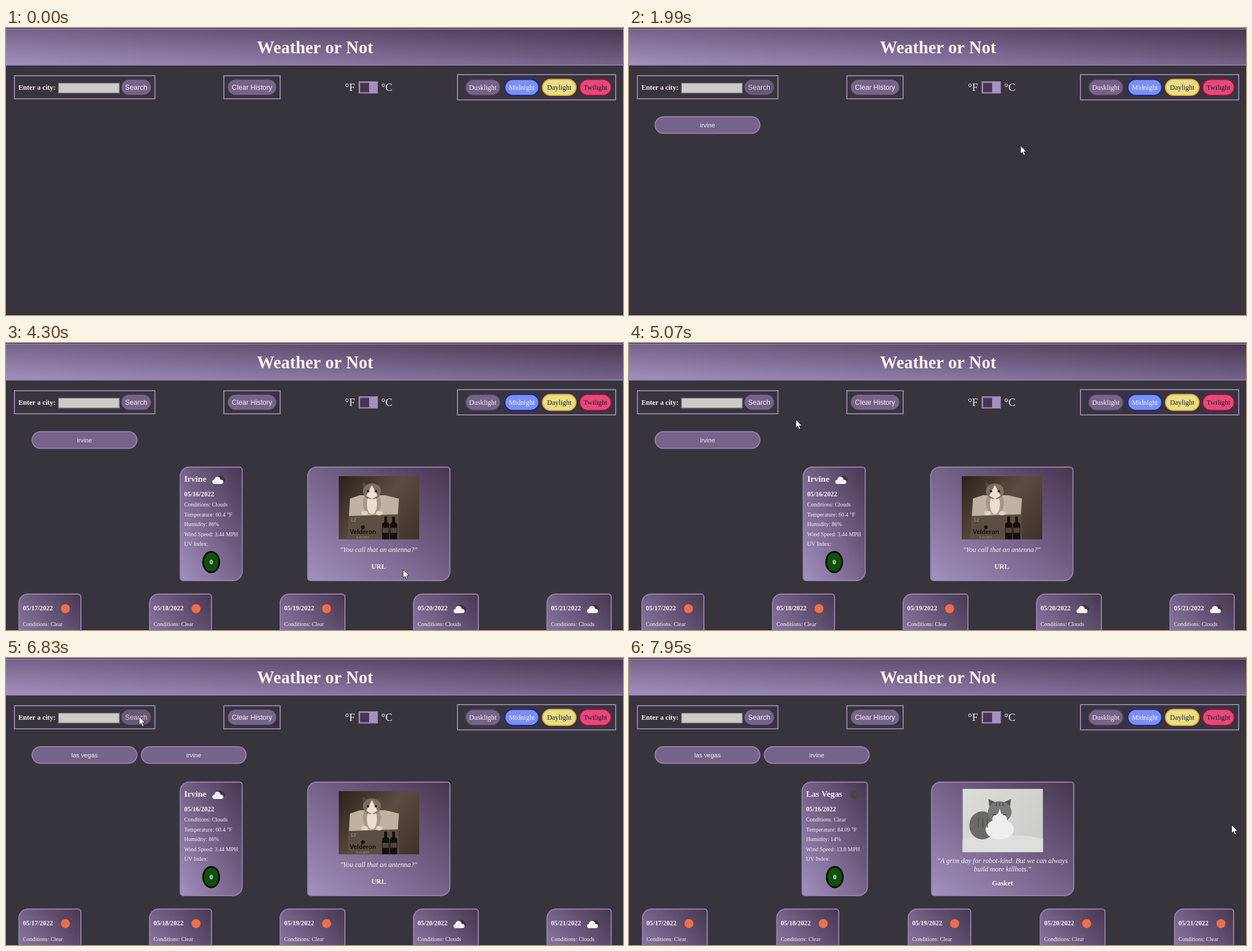
Animation of 1096x511 px, one loop 8 s. Source, as an HTML page with a canvas:

```html
<!DOCTYPE html>
<html lang="en">
<head>
<meta charset="utf-8">
<title>Weather or Not</title>
<style>
html, body { margin: 0; width: 100%; height: 100%; overflow: hidden; background: #38343d; }
canvas { display: block; }
</style>
</head>
<body>
<canvas id="stage" width="1096" height="511"></canvas>
<script>
const ctx = document.getElementById('stage').getContext('2d');
const LOOP = 8000, STEP = 70, ROW = 22.6;
const SERIF = '"Liberation Serif", "Times New Roman", serif';
const SANS = '"Liberation Sans", Arial, sans-serif';
const MENU = '"Open Sans", "Noto Sans", sans-serif';
const INK = '#ffeff3', EDGE = '#9680ae', MID = '#756389', LIGHT = '#a391bf', DARK = '#47364f';
const BACK = '#38343d', RIM = '#2b2730';

// Cursor: when it sets off, when it arrives, where
const FIELD = [154, 108], SEARCH = [236, 104];
const MOVES = [
  [200, 880, FIELD], [1020, 1230, [166, 141]], [1510, 1780, SEARCH],
  [1850, 1990, [695, 209]], [1990, 2480, [934, 266]],
  [2810, 3230, [705, 419]], [3430, 3570, [705, 403]],
  [4300, 4580, [878, 370]], [4580, 5070, [296, 136]],
  [5140, 5630, FIELD], [5980, 6190, [179, 143]], [6260, 6400, [172, 158]], [6540, 6760, SEARCH],
  [6830, 7390, [1098, 282]], [7390, 7950, [1070, 297]]
];

const SEARCHES = [
  { query: 'irvine', open: 880, pick: 1370, submit: 1850, ready: 2130, photoAt: 2340,
    name: 'Irvine', x: 308.5, w: 112, icon: 'cloud', quoteX: 535, photo: kitten,
    facts: ['Clouds', '60.4 °F', '86%', '3.44 MPH', ''],
    quote: ['"You call that an antenna?"'], quoteY: 372, by: 'URL', byY: 402,
    firstX: 22, gap: 120, widths: [112, 112, 117, 117, 116], clearDays: 3 },
  { query: 'las vegas', open: 5700, pick: 6470, submit: 6830, ready: 7600, photoAt: 7810,
    name: 'Las Vegas', x: 306.5, w: 118, icon: 'night', quoteX: 536.5, photo: tabby,
    facts: ['Clear', '84.09 °F', '14%', '13.8 MPH', ''],
    quote: ['"A grim day for robot-kind. But we can always', 'build more killbots."'],
    quoteY: 365, by: 'Gasket', byY: 405,
    firstX: 23, gap: 121.5, widths: [117, 112, 113, 117, 107], clearDays: 5 }
];
const LABELS = ['Conditions', 'Temperature', 'Humidity', 'Wind Speed', 'UV Index'];
const RECENT = ['irvine', 'las vegas', 'laayoune', 'Irvine', 'tokyo', 'houston'];

const ramp = (t, a, b) => Math.max(0, Math.min(1, (t - a) / (b - a)));
const ease = p => p * p * (3 - 2 * p);

function text(s, x, y, size, { font = SERIF, style = '', color = INK, align = 'left' } = {}) {
  ctx.font = `${style} ${size}px ${font}`;
  ctx.fillStyle = color;
  ctx.textAlign = align;
  ctx.fillText(s, x, y);
}

function rect(x, y, w, h, color) {
  ctx.fillStyle = color;
  ctx.fillRect(x, y, w, h);
}

function frame(x, y, w, h) {
  ctx.strokeStyle = EDGE;
  ctx.lineWidth = 2;
  ctx.strokeRect(x + 1, y + 1, w - 2, h - 2);
}

function round(x, y, w, h, r, fill, edge) {
  const inset = edge ? 1 : 0;
  ctx.beginPath();
  ctx.roundRect(x + inset, y + inset, w - 2 * inset, h - 2 * inset, r);
  ctx.fillStyle = fill;
  ctx.fill();
  if (!edge) return;
  ctx.strokeStyle = edge;
  ctx.lineWidth = 2;
  ctx.stroke();
}

function oval(x, y, rx, ry, color) {
  ctx.fillStyle = color;
  ctx.beginPath();
  ctx.ellipse(x, y, rx, ry, 0, 0, 7);
  ctx.fill();
}

function poly(color, ...p) {
  ctx.fillStyle = color;
  ctx.beginPath();
  for (let i = 0; i < p.length; i += 2) ctx.lineTo(p[i], p[i + 1]);
  ctx.closePath();
  ctx.fill();
}

function blend(x0, y0, x1, y1, ...colors) {
  const g = ctx.createLinearGradient(x0, y0, x1, y1);
  colors.forEach((c, i) => g.addColorStop(i / (colors.length - 1), c));
  return g;
}

// Corner to corner, bottom left to top right
function dusk(x, y, w, h) {
  const k = w * h / (w * w + h * h), cx = x + w / 2, cy = y + h / 2;
  return blend(cx - h * k, cy + w * k, cx + h * k, cy - w * k, LIGHT, MID, DARK);
}

function card(x, y, w, h) {
  round(x, y, w, h, [16, 5, 16, 5], dusk(x, y, w, h), EDGE);
}

function cloud(x, y) {
  const puff = '#f5f2f3', shade = '#3b343f';
  oval(x + 4, y - 3, 5, 4.5, shade);
  oval(x + 8, y, 4.5, 4, shade);
  oval(x - 1, y, 5.5, 5.5, puff);
  round(x - 10, y, 19.5, 7.5, 3.7, puff);
}

function photo(x, y, paint) {
  ctx.save();
  ctx.translate(x, y);
  ctx.beginPath();
  ctx.rect(0, 0, 143, 112.5);
  ctx.clip();
  paint();
  ctx.restore();
}

function ears(x, y, reach, color) {
  for (const s of [-1, 1]) poly(color, x + s * reach, y, x + s * 5, y + 7, x + s * (reach - 2), y + 18);
}

function kitten() {
  rect(0, 0, 143, 113, blend(0, 0, 143, 113, '#2b221b', '#5a4c40', '#3d3128'));
  poly('#bfb2a0', 20, 40, 38, 34, 82, 34, 107, 40, 105, 70, 18, 72);
  poly('#5b4e42', 18, 71, 106, 68, 107, 113, 15, 113);
  oval(59, 48, 16, 21, '#a59786');
  oval(59, 50, 9, 18, '#e8dfd2');
  ears(59, 10, 17, '#55483d');
  oval(59, 27, 16, 14, '#7d6e60');
  poly('#ebe2d5', 59, 16, 69, 35, 59, 41, 49, 35);
  for (const s of [-1, 1]) {
    oval(59 + s * 7, 27, 2.4, 2, '#201a16');
    oval(59 + s * 13, 66, 6, 4, '#ddd2c3');
    const x = 90 + s * 7;
    rect(x - 2, 72, 5, 14, '#15100d');
    round(x - 6, 82, 13, 34, 5, '#15100d');
    rect(x - 5, 92, 11, 9, '#51443a');
  }
  text('12', 21, 81, 9, { font: SANS, color: '#a59686' });
  oval(43, 91, 3.5, 3.5, '#1d1713');
  text('Velderon', 43, 103, 11, { font: SANS, style: 'bold', color: '#15100d', align: 'center' });
  text('LIGHT', 43, 111, 7, { style: 'bold', color: '#8c7e6f', align: 'center' });
}

function tabby() {
  rect(0, 0, 143, 113, blend(0, 0, 143, 113, '#dcddd8', '#c9cbc6'));
  oval(75, 113, 110, 31, '#dededb');
  oval(35, 65, 23, 25, '#6c6a67');
  oval(66, 72, 25, 18, '#eeeeec');
  ears(66, 18, 20, '#5a5855');
  oval(66, 41, 21, 19, '#7b7976');
  oval(66, 54, 13, 10, '#efeeec');
  poly('#efeeec', 66, 35, 71, 52, 61, 52);
  for (const s of [-1, 0, 1]) {
    rect(65.3 + s * 6, 24, 1.4, 7, '#454340');
    rect(35 + s * 8, 52, 2, 17, '#55534f');
    if (s) rect(62.5 + s * 9, 45, 7, 1.5, '#454340');
  }
}

function weather(c, t) {
  const x = c.x + 8, mid = c.x + c.w / 2, q = c.quoteX + 127;
  card(c.x, 220, c.w, 204);
  text(c.name, x, 247, 15.1, { style: 'bold' });
  if (c.icon === 'cloud') cloud(376.5, 243.5);
  else oval(401, 244, 8, 8, '#48444a');
  text('05/16/2022', x, 273, 11.7, { style: 'bold' });
  c.facts.forEach((s, i) => text(`${LABELS[i]}: ${s}`, x, 291 + i * 17.6, 10));
  oval(mid, 390, 15.8, 19.8, '#040804');
  oval(mid, 390, 12.8, 16.8, '#0f500f');
  text('0', mid, 394, 12.4, { style: 'bold', align: 'center' });

  card(c.quoteX, 220, 254.5, 204);
  if (t >= c.photoAt) photo(q - 71, c.quoteY - 135 + (c.quote.length - 1) * 3, c.photo);
  c.quote.forEach((s, i) => text(s, q, c.quoteY + i * 14.5, 12.4, { style: 'italic', align: 'center' }));
  text(c.by, q, c.byY, 12.4, { style: 'bold', align: 'center' });

  let left = c.firstX;
  c.widths.forEach((w, i) => {
    const clear = i < c.clearDays;
    card(left, 446, w, 160);
    text(`05/${17 + i}/2022`, left + 8, 475.5, 11.7, { style: 'bold' });
    if (clear) oval(left + 83.5, 473, 8, 8, '#ec6e4c');
    else cloud(left + 82, 473.5);
    text('Conditions: ' + (clear ? 'Clear' : 'Clouds'), left + 8, 503.5, 10);
    left += w + c.gap;
  });
}

function button(label, x, w) {
  round(x, 92, w, 27, 13.5, MID);
  text(label, x + w / 2, 109.5, 12.4, { font: SANS, align: 'center' });
}

function theme(label, x, w, fill, edge, color) {
  round(x, 90.5, w, 30.5, 15, fill, edge);
  text(label, x + w / 2, 110, 12.4, { align: 'center', color });
}

function page(t) {
  rect(0, 0, 1096, 511, BACK);
  rect(0, 0, 1096, 1, RIM);
  rect(0, 510, 1096, 1, RIM);
  rect(0, 1, 1096, 65.5, dusk(0, 1, 1096, 65.5));
  for (const y of [1, 65]) rect(0, y, 1096, 1.6, EDGE);
  text('Weather or Not', 549, 45, 31, { style: 'bold', align: 'center' });

  frame(14, 84, 251.5, 43);
  text('Enter a city:', 22, 109.5, 12.4, { style: 'bold' });
  const hover = Math.max(...SEARCHES.map(({ submit: s }) =>
    ramp(t, s - 210, s - 90) * (1 - ramp(t, s + 180, s + 560))));
  ctx.globalAlpha = 1 - 0.2 * hover;
  button('Search', 205, 52.5);
  ctx.globalAlpha = 1;

  frame(386, 84, 102, 43);
  button('Clear History', 394, 86);

  text('°F', 602, 112, 18.6);
  rect(626.5, 95, 34, 21.5, LIGHT);
  rect(629, 97.5, 16, 17, DARK);
  text('°C', 666.5, 112, 18.6);

  frame(801, 82, 283, 47);
  theme('Dusklight', 815, 64, MID, '#4a3953', INK);
  theme('Midnight', 885, 62.5, '#7b8ff2', '#14269a', '#f0efff');
  theme('Daylight', 952, 61.5, '#e8de88', '#e8a92f', '#241c28');
  theme('Twilight', 1018, 58, '#e34a7b', '#a00f33', '#2c1422');
}

function history(labels) {
  labels.forEach((label, i) => {
    const x = 45.5 + i * 194;
    round(x, 157, 188, 31.5, 15, MID, EDGE);
    text(label, x + 94, 177, 11.16, { font: SANS, align: 'center' });
  });
}

function input(value, focused) {
  if (focused) {
    round(90.5, 95.5, 113, 22, 3, '#fff');
    round(91.5, 96.5, 111, 20, 2, '#101014');
    rect(93, 98, 108, 17, '#e8f0fe');
  } else {
    rect(92, 97, 110, 19.5, '#807c82');
    poly('#4f4c52', 92, 97, 202, 97, 200, 99, 94, 114.5, 92, 116.5);
    rect(93.5, 98.5, 107, 16.5, '#cdcaca');
  }
  text(value, 94, 109.5, 8, { font: MENU, color: '#101014' });
}

function menu(row) {
  poly('#26292b', 141, 123, 146.5, 117.5, 152, 123);
  round(133, 122.5, 53, 141.5, 2, '#26292b');
  if (row >= 0) rect(133, 125 + row * ROW, 53, ROW, '#3c4042');
  RECENT.forEach((s, i) => text(s, 141, 139 + i * ROW, 8, { font: MENU, color: '#fff' }));
}

function pointer(t) {
  let [x, y] = [1057, 253];
  for (const [from, to, [tx, ty]] of MOVES) {
    if (t < from) break;
    const held = from + Math.floor((t - from) / STEP) * STEP;
    const p = ease(ramp(held, from, to));
    x += (tx - x) * p;
    y += (ty - y) * p;
  }
  return [x, y];
}

function arrow([x, y]) {
  ctx.save();
  ctx.translate(x, y);
  poly('#fff', 0.5, 0.5, 0.5, 15, 3.8, 12, 6, 17.5, 8.6, 16.4, 6.4, 11.2, 11, 11);
  ctx.strokeStyle = '#17151a';
  ctx.lineWidth = 0.8;
  ctx.stroke();
  ctx.restore();
}

function draw(t) {
  const tip = pointer(t);
  page(t);
  history(SEARCHES.filter(s => t >= s.submit).map(s => s.query).reverse());
  const shown = SEARCHES.filter(s => t >= s.ready).pop();
  if (shown) weather(shown, t);

  const active = SEARCHES.find(s => t >= s.open - STEP && t < s.submit);
  const open = active && t >= active.open && t < active.pick;
  const row = open ? Math.floor((tip[1] - 125) / ROW) : -1;
  const picked = active && t >= active.pick;
  input(picked ? active.query : RECENT[row] || '', active);
  if (open) {
    rect(93, 101, 0.8, 10, '#14141a');
    menu(row);
  }
  if (t >= 200) arrow(tip);
}

function tick(now) {
  draw(now % LOOP);
  requestAnimationFrame(tick);
}
draw(0);
requestAnimationFrame(tick);
</script>
</body>
</html>
```
